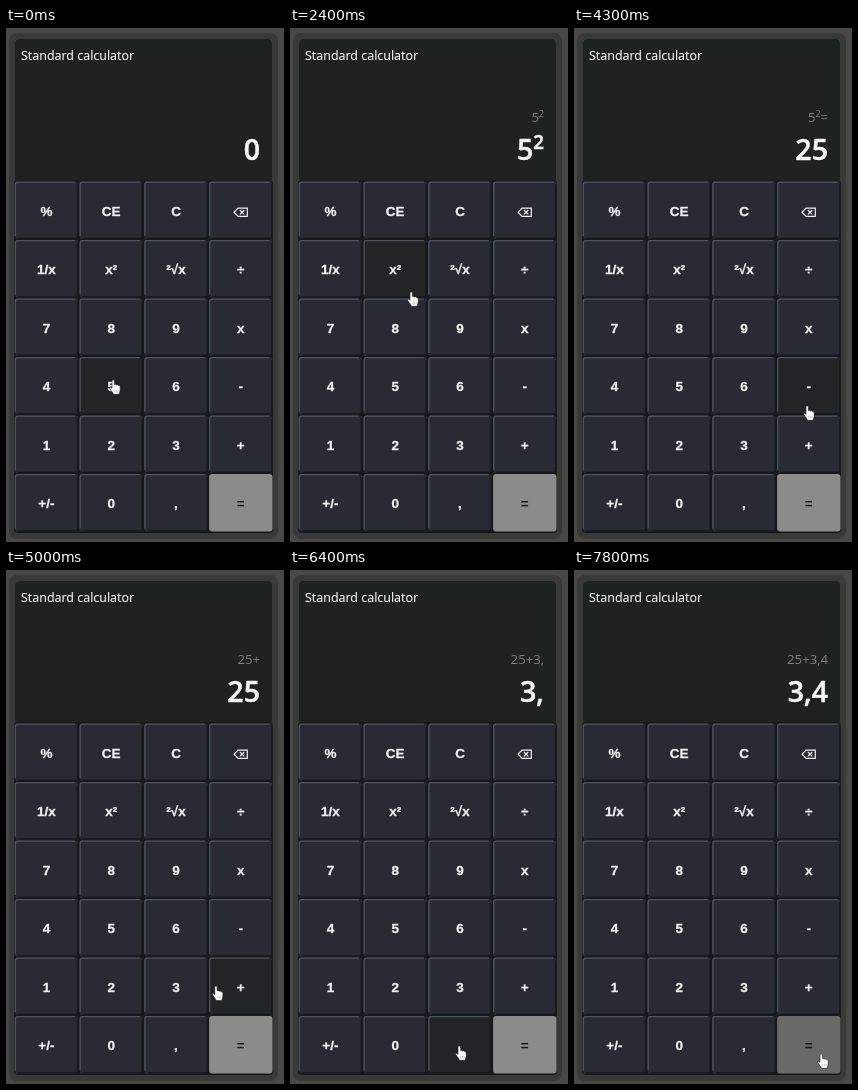
Write an HTML page that moves like this. It is 278 px wide and 514 px high and loops after 8000 ms.

```html
<!DOCTYPE html>
<html lang="en">
<head>
<meta charset="utf-8">
<title>Standard calculator</title>
<style>
html, body { margin: 0; width: 100%; height: 100%; overflow: hidden; background: #484846; }
svg { display: block; }
.display { font-family: "Open Sans", "Noto Sans", sans-serif; fill: #f4f5f4; stroke: #f4f5f4; stroke-width: .15; }
.title { font-size: 12.5px; }
.expr { font-size: 13.2px; fill: #7f8280; stroke: none; text-anchor: end; }
.result { font-size: 28.6px; font-weight: 600; stroke-width: .5; text-anchor: end; }
.sup { font-size: .66em; baseline-shift: .58em; }
.key { font: bold 13.5px "Liberation Sans", Arial, sans-serif; fill: #f1f2f3; text-anchor: middle; }
.key text { stroke: #f1f2f3; stroke-width: .3; }
.face { fill: #282b33; }
.lit, .shade { fill: none; stroke-width: 1.3; }
.lit { stroke: #4b5663; }
.shade { stroke: #14171b; }
.hover .face { fill: #232426; }
.pressed .lit { stroke: #0c0d0f; stroke-width: 2.5; }
.pressed .shade { stroke: #4f5a6a; stroke-width: 1.6; }
.equals, .equals text { fill: #161616; stroke: none; }
.equals .face { fill: #8b8b89; }
.equals .lit, .equals .shade { stroke: none; }
.equals.hover .face { fill: #696968; }
.equals.pressed .lit { stroke: #141516; }
.equals.pressed .shade { stroke: #737577; }
</style>
</head>
<body>
<svg width="278" height="514" viewBox="0 0 278 514">
  <rect width="278" height="514" fill="#484846"/>
  <rect x="3" y="5" width="269" height="506" rx="8" fill="#393a38"/>
  <rect x="8" y="152" width="259" height="353" rx="4" fill="#16191c"/>
  <path d="M9 152V16Q9 11 14 11H261Q266 11 266 16V152Z" fill="#1e2221"/>
  <g class="display">
    <text class="title" x="15" y="32">Standard calculator</text>
    <text class="expr" id="expr" x="254" y="94"></text>
    <text class="result" id="result" x="254" y="132"></text>
  </g>
  <g id="keys"></g>
  <g id="hand">
    <path d="M3 1.5Q4.2 .2 5.4 1.5V5.6Q6.6 4.9 7.4 6Q8.7 5.4 9.4 6.6Q11 6.2 11.2 8V11Q11 13 10 15.3H4.4Q3.2 12.6 .8 9.8Q.2 8.3 1.6 8.2L3 9.3Z"
      fill="#fff" stroke="#1c1c1c" stroke-width=".6" stroke-linejoin="round"/>
    <path d="M5.9 11V13.4M7.5 11V13.4M9.1 11V13.4" stroke="#999" stroke-width=".5"/>
  </g>
</svg>
<script>
const LOOP = 8000, STEP = 100;
const LEFT = 8.7, TOP = 153.5, DX = 64.8, DY = 58.5, W = 63.4, H = 57.4;
const labels = ['%', 'CE', 'C', '⌫', '1/x', 'x²', '²√x', '÷', '7', '8', '9', 'x',
  '4', '5', '6', '-', '1', '2', '3', '+', '+/-', '0', ',', '='];

// Time, x, y of the pointer; equal neighbours are rests.
const path = [
  [0, 103, 351], [1200, 103, 351], [1800, 104, 250], [2200, 104, 250],
  [2400, 117, 263], [3000, 237, 472], [3700, 237, 472], [4100, 229, 369],
  [4200, 229, 369], [4300, 229, 377], [4500, 230, 419], [4800, 230, 419],
  [5300, 161, 408], [5900, 161, 408], [6100, 165, 475], [6400, 165, 475],
  [6700, 39, 364], [7200, 39, 364], [7800, 243, 483], [LOOP, 243, 483]
];
// Press time, key, then the two display lines shown on release.
const presses = [
  [1000, '5', '5', '5'], [2000, 'x²', '5²', '5²'], [3300, '=', '5²=', '25'],
  [4700, '+', '25+', '25'], [5800, '3', '25+3', '3'],
  [6300, ',', '25+3,', '3,'], [7000, '4', '25+3,4', '3,4']
];

const $ = id => document.getElementById(id);
const raised = text => text.replace('²', '<tspan class="sup">2</tspan>');
const eraser = (x, y) => `<g transform="translate(${x - 7.5} ${y - 4})" fill="none" stroke="#f1f2f3" stroke-width="1.2">
  <path d="M.8 4.8 4.8.7H14V8.9H4.8Z"/><path d="M6.6 2.6 11 7M11 2.6 6.6 7"/></g>`;

function keyMarkup(label, i) {
  const x = LEFT + i % 4 * DX, y = TOP + Math.floor(i / 4) * DY;
  const cx = x + W / 2, cy = y + H / 2;
  const cap = label === '⌫' ? eraser(cx, cy + 1.2)
    : `<text x="${cx}" y="${cy + 5.5}">${label}</text>`;
  return `<g class="key"><rect class="face" x="${x}" y="${y}" width="${W}" height="${H}" rx="3"/>
    <path class="lit" d="M${x + .6} ${y + H - 3}V${y + 3}q0-2.4 2.4-2.4H${x + W - 3}"/>
    <path class="shade" d="M${x + 3} ${y + H - .6}H${x + W - 3}q2.4 0 2.4-2.4V${y + 3}"/>${cap}</g>`;
}

$('keys').innerHTML = labels.map(keyMarkup).join('');
const keys = [...$('keys').children];
keys[labels.indexOf('=')].classList.add('equals');

function pointerAt(t) {
  const i = path.findIndex(p => p[0] > t);
  const [t0, x0, y0] = path[i - 1], [t1, x1, y1] = path[i];
  const u = (t - t0) / (t1 - t0), e = u * u * (3 - 2 * u);
  return [x0 + (x1 - x0) * e, y0 + (y1 - y0) * e];
}

function draw(t) {
  const [x, y] = pointerAt(t);
  const over = Math.floor((x + 4 - LEFT) / DX) + 4 * Math.floor((y + 1 - TOP) / DY);
  const down = presses.find(p => t >= p[0] && t < p[0] + STEP);
  const shown = presses.filter(p => t >= p[0] + STEP).pop();
  keys.forEach((key, i) => {
    key.classList.toggle('hover', i === over);
    key.classList.toggle('pressed', !!down && labels[i] === down[1]);
  });
  $('expr').innerHTML = shown ? raised(shown[2]) : '';
  $('result').innerHTML = shown ? raised(shown[3]) : '0';
  $('hand').setAttribute('transform', `translate(${x} ${y})`);
}

const start = performance.now();
function tick() {
  const t = (performance.now() - start) % LOOP;
  draw(Math.floor(t / STEP) * STEP);
  requestAnimationFrame(tick);
}
tick();
</script>
</body>
</html>
```
